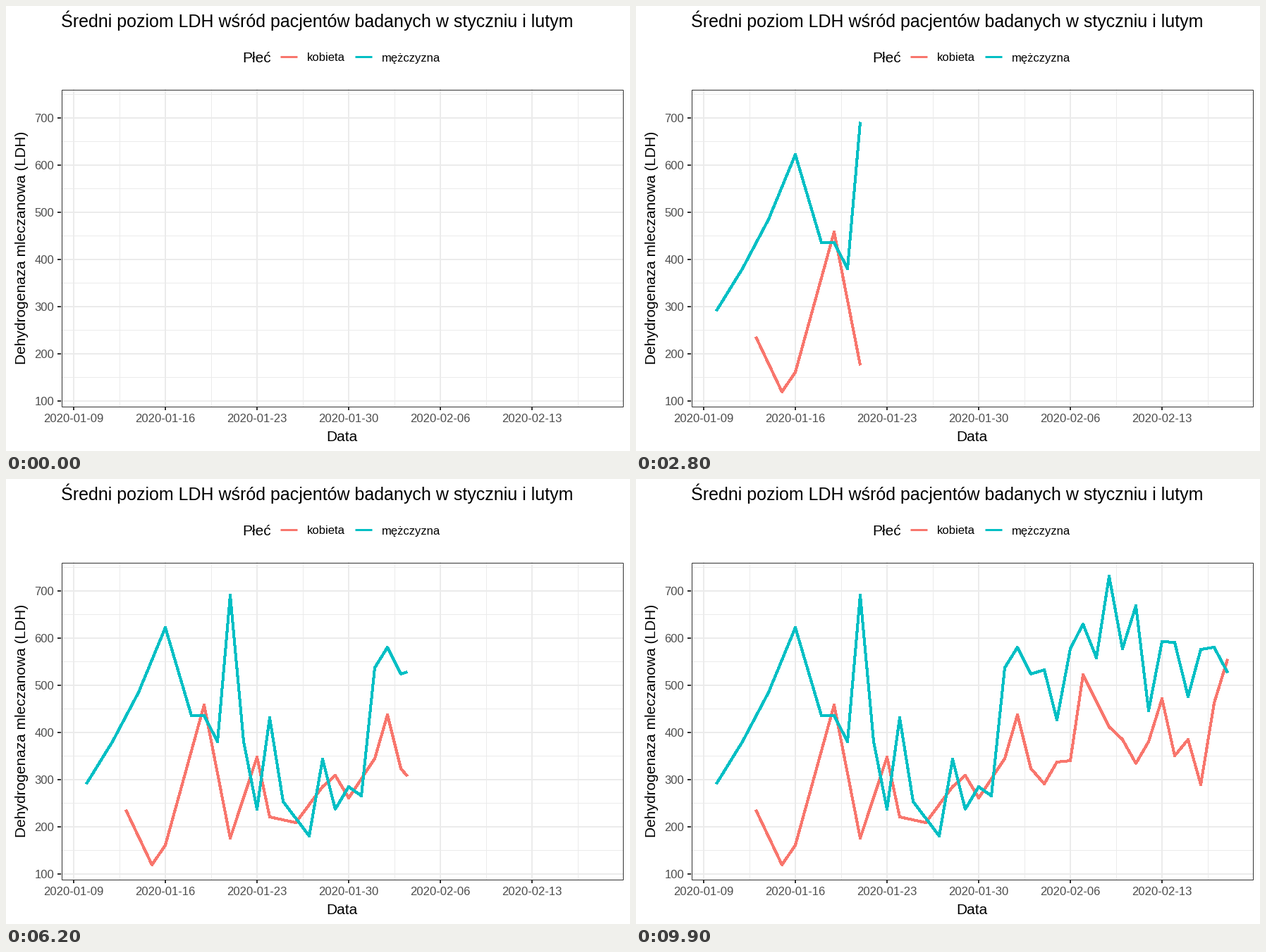
Animation of 885x632 px, one loop 10 s. Source, as a matplotlib script:

```python
import numpy as np
import matplotlib.pyplot as plt
from matplotlib.animation import FuncAnimation
from matplotlib.patches import Rectangle

W, H, DPI = 885, 632, 100
FRAMES, INTERVAL = 100, 100
LEFT, RIGHT, TOP, BOTTOM = 78, 875, 118, 569
PX = 72 / DPI  # one pixel in points
RED, TEAL, DARK, GREY = "#F8766D", "#00BFC4", "#333333", "#4D4D4D"

plt.rcParams["font.family"] = "Liberation Sans"
plt.rcParams["path.simplify"] = False

# days after 2020-01-09 and the mean LDH level on each
women_days = [4, 6, 7, 10, 12, 14, 15, 17, 19, 20, 21, *range(23, 30), *range(31, 41)]
women_ldh = [235, 119, 161, 458, 175, 347, 220, 208, 285, 308, 261,
             344, 437, 323, 291, 337, 340, 522,
             412, 385, 334, 380, 471, 350, 384, 289, 462, 555]
men_days = [1, 3, 5, 7, *range(9, 17), *range(18, 41)]
men_ldh = [290, 380, 485, 622, 435, 435, 380, 690, 380, 237, 431, 253,
           180, 343, 236, 285, 265, 536, 580, 523, 532, 426, 577, 629,
           557, 730, 577, 668, 446, 592, 590, 475, 575, 580, 527]


def px(day):
    return 95.6 + 18.575 * np.asarray(day, float)


def py(level):
    return 560.6 - 0.67 * (np.asarray(level, float) - 100)


fig = plt.figure(figsize=(W / DPI, H / DPI), dpi=DPI, facecolor="white")
ax = fig.add_axes([0, 0, 1, 1])
ax.set_xlim(0, W)
ax.set_ylim(H, 0)
ax.axis("off")


def rule(x, y, color, width, z=1):
    ax.plot(x, y, color=color, lw=width * PX, solid_capstyle="butt", snap=True, zorder=z)


def label(x, y, text, size, color="black", ha="left", rotation=0):
    ax.text(x, y, text, fontsize=size, color=color, ha=ha, va="baseline",
            rotation=rotation, rotation_mode="anchor")


def curve(color):
    return ax.plot([], [], color=color, lw=3 * PX, antialiased=False,
                   solid_capstyle="butt", solid_joinstyle="round", zorder=3)[0]


# grid
for day in np.arange(3.5, 40, 7):
    rule([px(day)] * 2, [TOP, BOTTOM], "#EBEBEB", 1)
for level in range(150, 751, 100):
    rule([LEFT, RIGHT], [py(level)] * 2, "#EBEBEB", 1)
for level in range(100, 701, 100):
    y = py(level)
    rule([LEFT, RIGHT], [y, y], "#EBEBEB", 2)
    rule([LEFT - 5, LEFT], [y, y], DARK, 2)
    label(68, y + 6.3, str(level), 12, GREY, "right")
dates = ["2020-01-09", "2020-01-16", "2020-01-23",
         "2020-01-30", "2020-02-06", "2020-02-13"]
for i, date in enumerate(dates):
    x = px(7 * i)
    rule([x, x], [TOP, BOTTOM], "#EBEBEB", 2)
    rule([x, x], [BOTTOM, BOTTOM + 5], DARK, 2)
    label(x, 591, date, 12, GREY, "center")
ax.add_patch(Rectangle((LEFT + .5, TOP + .5), RIGHT - LEFT - 1, BOTTOM - TOP - 1,
                       fill=False, ec=DARK, lw=PX, zorder=4))

# titles and legend
label(78, 30, "Średni poziom LDH wśród pacjentów badanych w styczniu i lutym", 18)
label(476, 617.5, "Data", 15, ha="center")
label(28, 343, "Dehydrogenaza mleczanowa (LDH)", 15, ha="center", rotation=90)
label(335, 80, "Płeć", 15)
for x, color, name in [(388.5, RED, "kobieta"), (494.5, TEAL, "mężczyzna")]:
    rule([x, x + 24.5], [71.5, 71.5], color, 3)
    label(x + 38.5, 78.5, name, 12)


class Series:
    """A line whose points land on whole frames, with a straight run between."""

    def __init__(self, days, levels, color):
        self.days, self.levels = np.array(days, float), np.array(levels, float)
        steps = (self.days - 1) / 39 * (FRAMES - 1)
        self.at = np.round(steps)
        self.at[0] = np.floor(steps[0])
        self.line = curve(color)

    def reveal(self, frame):
        if frame <= self.at[0]:
            self.line.set_data([], [])
            return
        past = self.at < frame
        days = np.append(self.days[past], np.interp(frame, self.at, self.days))
        levels = np.append(self.levels[past], np.interp(frame, self.at, self.levels))
        self.line.set_data(np.round(px(days)), np.round(py(levels)))


series = [Series(women_days, women_ldh, RED), Series(men_days, men_ldh, TEAL)]


def update(frame):
    for s in series:
        s.reveal(frame)
    return [s.line for s in series]


anim = FuncAnimation(fig, update, frames=FRAMES, interval=INTERVAL,
                     init_func=lambda: update(0), repeat=True, repeat_delay=0)
plt.show()
```
